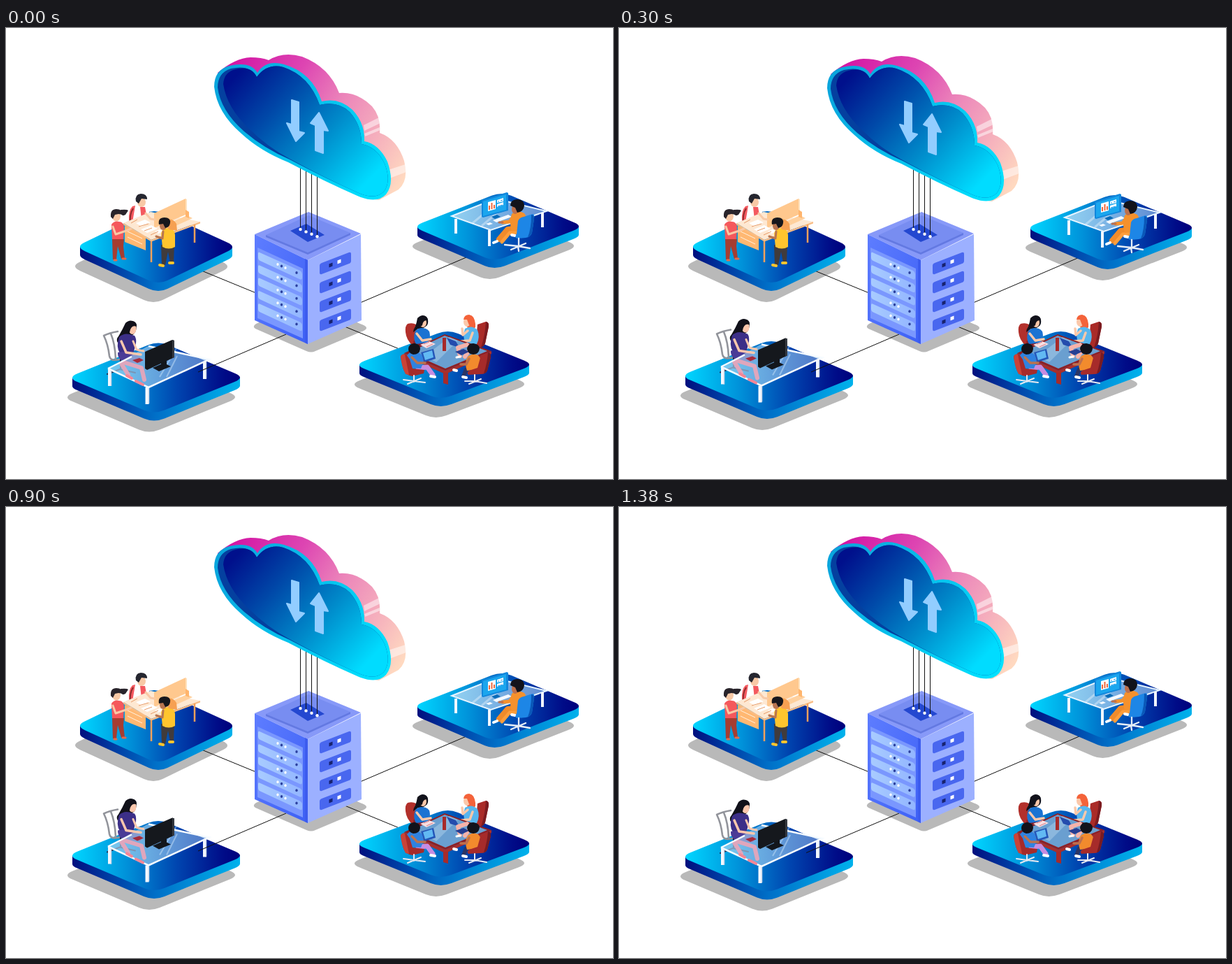
Write an HTML page that moves like this. It is 869 by 645 pixels and loops after 1500 ms.

```html
<!DOCTYPE html>
<html lang="en">
<head>
<meta charset="utf-8">
<title>Cloud network</title>
<style>
html, body { margin: 0; width: 100%; height: 100%; overflow: hidden; background: #fff; }
svg { display: block; width: 869px; height: 645px; }
.limb { fill: none; stroke-linecap: round; stroke-linejoin: round; }
</style>
</head>
<body>
<svg viewBox="0 0 869 645" xmlns="http://www.w3.org/2000/svg">
<defs>
  <linearGradient id="face"><stop stop-color="#00d6ff"/><stop offset=".32" stop-color="#0092da"/><stop offset=".62" stop-color="#0046b0"/><stop offset=".9" stop-color="#000c88"/><stop offset="1" stop-color="#00007c"/></linearGradient>
  <linearGradient id="side"><stop stop-color="#000f7e"/><stop offset=".2" stop-color="#0038a0"/><stop offset=".5" stop-color="#0070c8"/><stop offset="1" stop-color="#00b2ec"/></linearGradient>
  <linearGradient id="edge" gradientUnits="userSpaceOnUse" x1="320" y1="50" x2="570" y2="215"><stop stop-color="#d315a4"/><stop offset=".3" stop-color="#dd45b2"/><stop offset=".55" stop-color="#ec86ba"/><stop offset=".8" stop-color="#f6b3bd"/><stop offset="1" stop-color="#ffd9c0"/></linearGradient>
  <linearGradient id="rim" gradientUnits="userSpaceOnUse" x1="300" y1="70" x2="550" y2="230"><stop stop-color="#0aa4dc"/><stop offset="1" stop-color="#00e2ff"/></linearGradient>
  <linearGradient id="sky" gradientUnits="userSpaceOnUse" x1="335" y1="62" x2="510" y2="228"><stop stop-color="#00108c"/><stop offset=".3" stop-color="#0048a8"/><stop offset=".62" stop-color="#008aca"/><stop offset="1" stop-color="#00dcff"/></linearGradient>
  <linearGradient id="slat"><stop stop-color="#a8cbff"/><stop offset="1" stop-color="#93b6ff"/></linearGradient>
  <linearGradient id="front" x2="1" y2="1"><stop stop-color="#5e7dff"/><stop offset="1" stop-color="#3d60f5"/></linearGradient>
  <linearGradient id="glass"><stop stop-color="#b8dcf4" stop-opacity=".8"/><stop offset="1" stop-color="#86b4e8" stop-opacity=".72"/></linearGradient>
</defs>

<g id="shadows" fill="#b9b9b9"><path d="M357 430Q352 427 358 423L433 391L512 425Q520 429 512 433L443 462Q437 465 430 462Z"/></g>
<path d="M280 347L358 379M507 393L680 319M485 427L575 464" stroke="#111" fill="none"/>
<g id="bases"></g>

<!-- shared desk, three people -->
<g>
  <path d="M177 260q2-7 9-7h11q7 2 8 10l2 15-15 6-15-6z" fill="#fff"/>
  <path d="M176 276q-1-15 5-21l4-1-4 24zM192 256l7 0 3 16-8 2z" fill="#f4595f"/>
  <path d="M182 258q-5 8-4 20" stroke="#7a2626" stroke-width="1.5" fill="none"/>
  <ellipse cx="194" cy="249" rx="6" ry="7" fill="#f8c9a6"/>
  <path d="M186 248q-2-10 7-11 9 0 9 8l-8-1-4 7z" fill="#25262f"/>
  <path d="M170 283l30 14v21l-30-12z" fill="#ffb872"/>
  <path d="M174 291l21 10M174 299l21 10" stroke="#fff0dc"/>
  <path d="M168 279l39-16 71 14-70 26z" fill="#fee8d2"/>
  <path d="M168 279l40 24 70-26v2.500l-70 26-40-24z" fill="#f8bd86"/>
  <path d="M212 265l45-21v23l-45 19z" fill="#ffc88e"/>
  <path d="M257 244l2 1v22l-2 1z" fill="#ffe2bd"/>
  <path d="M224 284l35-16 8 4-35 16z" fill="#ffd09d"/>
  <path d="M257 260l5 3v9l-5-2z" fill="#ffb56d"/>
  <path d="M186 279l13-5 8 4-13 6zM193 288l15-6 9 5-15 6zM213 291l7-3 5 3-7 3z" fill="#fff"/>
  <path d="M179 279l9-5M190 284l14-4M198 290l11-4M207 296l11-5" stroke="#e79b68"/>
  <path d="M208 305v30M270 281v26" stroke="#f3a15b" stroke-width="2.500"/>
  <path class="limb" d="M200 265l7 8 6 1" stroke="#f8c9a6" stroke-width="3"/>

  <path d="M164 260q9-1 11 1l-4 6q-5 3-7-2z" fill="#29242b"/>
  <ellipse cx="158" cy="269" rx="6" ry="7.5" fill="#f8c9a6"/>
  <path d="M150 270q-1-11 8-11 9 0 10 8l-7-1-5 1-3 6z" fill="#29242b"/>
  <path d="M151 281q4-6 11-4 6 0 7 8l-1 18h-16z" fill="#f5585c"/>
  <path d="M152 302h17l-1 10 2 18h-5l-5-18-2 19h-5z" fill="#a53d31"/>
  <path class="limb" d="M153 284l4 11 15-5 7-3" stroke="#f8c9a6" stroke-width="3"/>
  <path class="limb" d="M155 332l3 0M167 330l4 0" stroke="#e46a4c" stroke-width="3"/>

  <path d="M222 310h19l-1 25h-5l-3-15-4 19h-5z" fill="#403b3c"/>
  <path d="M222 294q2-8 11-8 9 2 9 10v17q-9 5-18 0z" fill="#ffc52e"/>
  <path d="M226 275q12-5 18 5l1 10-12-2z" fill="#f6a052"/>
  <path class="limb" d="M225 291l-1 10-9-3" stroke="#b97550" stroke-width="3"/>
  <ellipse cx="225" cy="283" rx="5" ry="6" fill="#b97550"/>
  <path d="M219 281q-2-10 8-10 9 0 8 8-1 6-7 7l-3-6z" fill="#17171c"/>
  <path class="limb" d="M220 339l5 1M234 336l5 0" stroke="#ffc52e" stroke-width="4"/>
</g>

<!-- single desk with monitor -->
<g class="left-desk">
  <path class="limb" d="M160 434q-12 2-20 6 6 12 8 29 1 6 8 6l14-2M150 437q6 14 7 36" stroke="#92949b" stroke-width="2.6"/>
  <path class="limb" d="M164 474v13M145 495l18-7 22 5" stroke="#20284a" stroke-width="2"/>
  <path d="M171 422q6-6 13-2 5 6 1 15-6 9-16 6-4 8-9 9-3-5 1-9 6-10 10-19z" fill="#11111a"/>
  <ellipse cx="181" cy="430" rx="5.5" ry="8" fill="#fbc7ad"/>
  <path d="M170 430q1-11 10-11 8 1 7 8-8-3-10 8-1 6-7 5z" fill="#11111a"/>
  <path d="M162 442q6-6 15-4l7 2q3 4 2 11l-3 12q-8 6-20 2-6-9-1-23z" fill="#3c2f88"/>
  <path d="M160 464q13-3 26 3l10 6-4 7-24-3q-9-5-8-13z" fill="#4a3b96"/>
  <path d="M146 487l57-32 88 19-87 40z" fill="url(#glass)" opacity=".82"/>
  <path class="limb" d="M168 478l26 8 4 17M165 480l10 16" stroke="#e0a6bc" stroke-width="6"/>
  <path class="limb" d="M165 448l7 16 21 3" stroke="#fbc7ad" stroke-width="3.5"/>
  <path d="M146 487l34-17M204 455l87 19-87 40-58-27" fill="none" stroke="#f6fbff" stroke-width="2.500"/>
  <path d="M220 499l24-41M230 499l15-30" stroke="#e0f2ff" stroke-opacity=".4" stroke-width="2"/>
  <path d="M148.500 488v24M202 514v24M284.500 477v25" stroke="#f4f8ff" stroke-width="5"/>
  <path d="M150.500 490v22M204.500 515v22M286.500 478v23" stroke="#cbd6e7" stroke-width="1.500"/>
  <path d="M210 486l16-7 10 5-17 7zM222 474h8v11h-8z" fill="#13161c"/>
  <path d="M199 463l39-17 3 1v24l-39 18-3-2z" fill="#15181d"/>
  <path d="M238 446l3 1v24l-3 1z" fill="#34383f"/>
  <path d="M181 475l10-3 6 3-9 4z" fill="#a62b3b"/>
  <path class="limb" d="M186 505l10 5M173 497l7 4" stroke="#f48696" stroke-width="4"/>
  <path class="limb" d="M182 448l5 12 10 2" stroke="#fbc7ad" stroke-width="3"/>
</g>
<path id="leftWire" stroke="#111" fill="none"/>

<!-- designer desk -->
<g class="right-desk">
  <path d="M638 269l63-25 73 18-80 27z" fill="url(#glass)"/>
  <path d="M638 269l63-25 73 18-80 27z" fill="none" stroke="#e6f4ff" stroke-width="2"/>
  <path d="M644 273v21M692 289v23M768 264v21M752 271v9" stroke="#f2f7ff" stroke-width="4"/>
  <path d="M668 279l35-29M681 283l25-21" stroke="#fff" stroke-opacity=".35" stroke-width="3"/>
  <path d="M681 246l36-11 2 1v25l-36 10-2-1z" fill="#1187dc"/>
  <path d="M683 248l33-10v22l-33 9z" fill="#1ba6ee"/>
  <path d="M690 249l11-3v13l-11 3zM703 246l9-3v5l-9 2zM703 252l9-3v4l-9 3z" fill="#fff"/>
  <path d="M692 260v-6M695.500 259v-9M699 258v-5" stroke="#f0683e" stroke-width="2"/>
  <path d="M704 248l2 0M708 247l3-1M704 255l7-2" stroke="#2a9be8"/>
  <path d="M695 270l8-3 5 3-8 3z" fill="#086bb8"/>
  <path d="M697 275l22-8 5 3-22 8zM687 280l6-2 4 2-6 2z" fill="#f5f9ff"/>
  <path class="limb" d="M738 286l-20 2-12 14" stroke="#f08b2b" stroke-width="8"/>
  <path class="limb" d="M735 292l-14 1-11 13" stroke="#ff9e3b" stroke-width="5"/>
  <path class="limb" d="M698 307l5-2M724 296l5 1" stroke="#fff" stroke-width="4"/>
  <path d="M724 266q8-7 18-1 6 7 4 24l-22 2q-4-11 0-25z" fill="#f5912d"/>
  <path class="limb" d="M727 269l-6 8-10 1" stroke="#f5912d" stroke-width="5"/>
  <path class="limb" d="M711 278l-5 0" stroke="#bd704d" stroke-width="3"/>
  <ellipse cx="729" cy="259" rx="5" ry="7" fill="#bd704d"/>
  <path d="M722 254q0-8 9-9 11 0 11 9-1 9-10 10l-3-7z" fill="#12131b"/>
  <path d="M733 276q2-5 8-6l13-4q3 0 2 7l-3 20q-2 6-9 7l-12 1q-5-1-1-6z" fill="#1d86e6"/>
  <path d="M752 267q4-1 4 6l-3 20q-2 5-6 6 5-12 5-32z" fill="#0a58b8"/>
  <path class="limb" d="M734 301v12M714 310l19 2 17 3M723 317l21-9M733 312l1 7" stroke="#e6edf6" stroke-width="2.300"/>
</g>

<!-- meeting table -->
<g>
  <path d="M575 423q7-2 12 1l5 26-10 4q-9-8-10-19-1-9 3-12z" fill="#b2302b"/>
  <path d="M584 447l25-3v8l-16 9-11-7z" fill="#85202a"/>
  <path d="M675 424l12-4q5 1 4 7l-5 24q-2 5-8 6l-6-2z" fill="#aa2b28"/>
  <path d="M687 420q5 1 4 7l-5 24q-2 5-6 6 6-17 7-37z" fill="#7b1b20"/>
  <path d="M589 415q7-7 13-2 4 6 1 12-7 7-13 5l-7 5q0-4 3-8 2-6 3-12z" fill="#12121b"/>
  <ellipse cx="597" cy="421" rx="5" ry="7" fill="#fbc8aa"/>
  <path d="M590 424q-1-12 8-12 6 1 6 6-7-1-8 7-2 3-6-1z" fill="#12121b"/>
  <path d="M586 433q6-6 15-3 6 2 6 10l-3 10-17 2q-5-8-1-19z" fill="#1b73d2"/>
  <path class="limb" d="M588 437l8 10 12-2" stroke="#fbc8aa" stroke-width="3.500"/>
  <path d="M656 414q5-5 11-1 6 5 5 15l-8 7-4-8z" fill="#f4633a"/>
  <ellipse cx="660" cy="420" rx="5" ry="7" fill="#fbc8aa"/>
  <path d="M655 417q1-7 8-7 9 2 8 13l-8 2-3-8z" fill="#f4633a"/>
  <path d="M657 430q10-6 18 2 4 10-1 20l-16 1q-5-12-1-23z" fill="#58b6ee"/>
  <path class="limb" d="M661 433l-7 6-1-9M668 436l-4 11-14 1" stroke="#fbc8aa" stroke-width="3.500"/>
  <path d="M570 465l58-27 67 24-66 28z" fill="#8e2024"/>
  <path d="M577 464l51-24 61 22-60 25z" fill="#6a9fd0"/>
  <path d="M600 469l35-27 12 5-31 31z" fill="#b4d2ea" opacity=".45"/>
  <path d="M570 465l59 25 66-28v4l-66 29-59-26z" fill="#a82f2c"/>
  <path d="M626 493h7v17l-7-2zM625 443h5v19h-5z" fill="#a72b2a"/>
  <path d="M593 453l13-5 9 4-13 6z" fill="#f8dfe1"/>
  <path d="M598 452l8-3M602 456l9-4" stroke="#d87987"/>
  <path d="M631 443l13 5 5 9-13-4z" fill="#244cad"/>
  <path class="limb" d="M660 453l-13 4 3 12M666 457l-9 13" stroke="#f6b3aa" stroke-width="6"/>
  <path class="limb" d="M650 470l-5 1M676 460l-10 4" stroke="#fff" stroke-width="3"/>

  <path class="limb" d="M590 486l13-1 8 11" stroke="#c78ce0" stroke-width="7"/>
  <path class="limb" d="M608 498l6 1" stroke="#fff" stroke-width="4"/>
  <path d="M574 468q6-7 16-4 8 3 8 13l-4 10-18-1z" fill="#2f82e0"/>
  <path d="M594 464l18-5 3 14-16 5z" fill="#2456b8"/>
  <path d="M597 465l13-4 2 10-12 4z" fill="#62b9f3"/>
  <path class="limb" d="M581 471l8 8 11 0" stroke="#b97351" stroke-width="3.500"/>
  <path d="M576 459q1-8 9-8 8 1 8 8-1 8-10 8-7-2-7-8z" fill="#12131b"/>
  <path d="M565 470q2-5 8-3l5 7 4 13 17 2-1 5-16 4q-10-1-13-10z" fill="#a62b2a"/>
  <path d="M565 470q2-5 6-3l6 29-5-1q-6-12-7-25z" fill="#c94337"/>
  <path class="limb" d="M584 497v9M569 503l15 2 16 2M575 509l19-8" stroke="#e7e9f1" stroke-width="2"/>

  <path class="limb" d="M672 485l-13 3-4 10" stroke="#2b3565" stroke-width="6"/>
  <path d="M661 470q7-6 15-2 7 7 2 20l-18 2q-4-11 1-20z" fill="#f28b2d"/>
  <path class="limb" d="M663 473l-4 8-8 0" stroke="#bd704d" stroke-width="3.500"/>
  <path d="M643 463l12-4 8 4-11 5z" fill="#263e92"/>
  <path d="M660 459q1-8 9-8 9 1 9 8-1 7-9 8-8-1-9-8z" fill="#12131b"/>
  <path class="limb" d="M641 489l4 1M654 499l5 1" stroke="#fff" stroke-width="4"/>
  <path d="M680 468l11-4q4 1 3 7l-5 19q-2 5-9 5l-18 1q-3-3 1-6l12-4z" fill="#a62b2a"/>
  <path d="M690 464q5 1 4 7l-5 19q-2 4-5 4 5-15 6-30z" fill="#781b21"/>
  <path class="limb" d="M671 496v10M657 505l14 0 17 3M663 509l17-7" stroke="#e7e9f1" stroke-width="2"/>
</g>

<!-- server -->
<g>
  <path d="M356 295l77-32 75 31-76 38z" fill="#8799f8"/>
  <path d="M372 296l61-28 60 25-61 28z" fill="#788df1"/>
  <path d="M372 296l60 25 61-28v3l-61 28-60-25z" fill="#6379e2"/>
  <path d="M407 290l23-10 26 16-24 10z" fill="#2448d0"/>
  <path d="M356 295l76 37v120l-76-34z" fill="url(#front)"/>
  <path d="M360 314l65 30v100l-65-29z" fill="#7a97fe"/>
  <path d="M432 332l76-37 1 123-77 34z" fill="#9cb0ff"/>
  <path d="M428 330l4 2v120l-4-2z" fill="#3c5cee"/>
  <g id="slats"></g>
</g>
<g id="wires"></g>

<!-- cloud -->
<g class="cloud">
  <path d="M303 64Q328 43 350 42Q366 42 376 46Q397 33 424 41Q463 56 477 93Q503 91 524 112Q537 127 535 150Q560 159 570 190Q577 218 562 231L534 246Q515 245 480 220L330 100Z" fill="url(#edge)"/>
  <path d="M512 139l22-11 2 8-23 11zM513 151l22-9 1 4-22 9zM547 203l25-8 1 11-24 9z" fill="#fff" opacity=".5"/>
  <path d="M298 84Q298 60 320 54Q350 47 360 64Q372 45 398 52Q439 64 452 105Q476 99 496 117Q514 136 513 162Q534 166 546 191Q557 222 544 238Q531 252 503 240Q455 219 404 192Q364 176 337 151Q302 121 298 84Z" fill="url(#rim)"/>
  <path d="M303 85Q303 64 322 58Q350 52 359 70Q374 50 397 56Q434 68 449 110Q475 104 492 120Q509 139 509 166Q531 170 542 194Q552 219 541 234Q529 246 505 236Q457 215 406 188Q369 172 341 148Q307 118 303 85Z" fill="#04409f"/>
  <path d="M311 80Q312 65 325 60Q350 52 359 70Q374 50 397 56Q434 68 449 110Q475 104 492 120Q509 139 509 166Q531 170 542 194Q552 219 541 234Q529 246 505 236Q457 215 406 187Q374 170 348 144Q316 114 311 80Z" fill="url(#sky)"/>
  <path d="M409 103l10 3v42l8 2-12 12-13-26 7 2zM448 121l13 26-7-1v33l-11-4v-36l-7-3z" fill="#92cdff" stroke="#92cdff" stroke-width="2" stroke-linejoin="round"/>
</g>
</svg>
<script>
const $ = id => document.getElementById(id);
const add = (id, markup) => $(id).insertAdjacentHTML("beforeend", markup);

// Rounded diamond: w and h are half sizes, lean shifts the lower tip.
function diamond(cx, cy, w, h, lean) {
  const cut = 0.115, grow = 1 / (1 - cut / 2);
  const tips = [[-w, 0], [-lean, -h], [w, 0], [lean, h]]
    .map(([x, y]) => [cx + x * grow, cy + y * grow]);
  const toward = (a, b) => a.map((v, i) => v + (b[i] - v) * cut);
  return tips.map((tip, i) => {
    const before = toward(tip, tips[(i + 3) % 4]), after = toward(tip, tips[(i + 1) % 4]);
    return `${i ? "L" : "M"}${before}Q${tip} ${after}`;
  }).join("") + "Z";
}

function platform(cx, cy, w, h, lean, name = "") {
  const depth = 12;
  add("shadows", `<path class="${name}" d="${diamond(cx - 7, cy + depth + 16, w, h, lean)}"/>`);
  add("bases", `<g class="${name}">
    <path d="${diamond(cx, cy + depth, w, h, lean)}M${cx - w} ${cy}h${2 * w}v${depth}h${-2 * w}z" fill="url(#side)"/>
    <path d="${diamond(cx, cy, w, h, lean)}" fill="url(#face)"/></g>`);
}
platform(215, 313, 109, 51, 3);
platform(215, 500, 120, 49.5, -3, "left-desk");
platform(704.5, 284, 115.5, 47, -5, "right-desk");
platform(627.5, 481.5, 121.5, 47.5, -5);

for (let i = 0; i < 5; i++) {
  const y = i * 18.4;
  const lights = [[389, 338], [394.5, 340.5], [400, 343], [416, 350]]
    .map(([x, ly], k) => `<ellipse cx="${x}" cy="${ly + y}" rx="1.7" ry="2" fill="${k % 2 ? "#2c409f" : "#f8fbff"}"/>`).join("");
  add("slats", `<path d="M363 ${321 + y}l58 26q3 2 3 5v5q0 4-4 2l-56-26q-3-1-3-5v-5q0-3 2-2z" fill="url(#slat)"/>${lights}`);
}
for (let i = 0; i < 4; i++) {
  const y = i * 27;
  add("slats", `<path d="M452 ${336 + y}l39-15q3-1 3 2v10q0 3-3 4l-39 15q-3 1-3-2v-10q0-3 3-4z" fill="#4967ef"/>
    <path d="M462.500 ${337.5 + y}l5-2v5l-5 2z" fill="#18236f"/><path d="M474.500 ${332.5 + y}l5-2v5l-5 2z" fill="#fff"/>`);
}
for (let i = 0; i < 4; i++) {
  const x = 421.5 + i * 8, y = 288 + i * 3.4;
  add("wires", `<path d="M${x} 185V${y}" stroke="#111"/><circle cx="${x}" cy="${y}" r="2.200" fill="#fff"/>`);
}

const hold = 300;
const bob = {
  "cloud": [0, 2, 3, 2, 0],
  "left-desk": [0, -2.5, -3.5, -1.5, 0],
  "right-desk": [0, 2, 3, 1, 0]
};
const wireEnd = [[275, 492], [275, 492], [275, 492], [275, 492], [268, 494.5]];
const movers = Object.entries(bob).map(([name, path]) => [document.querySelectorAll("." + name), path]);

function draw(time) {
  const step = Math.floor(time / hold) % 5;
  for (const [parts, path] of movers)
    for (const part of parts) part.setAttribute("transform", `translate(0 ${path[step]})`);
  $("leftWire").setAttribute("d", `M401 438L${wireEnd[step]}`);
}
function tick() {
  draw(performance.now());
  requestAnimationFrame(tick);
}
tick();
</script>
</body>
</html>
```
